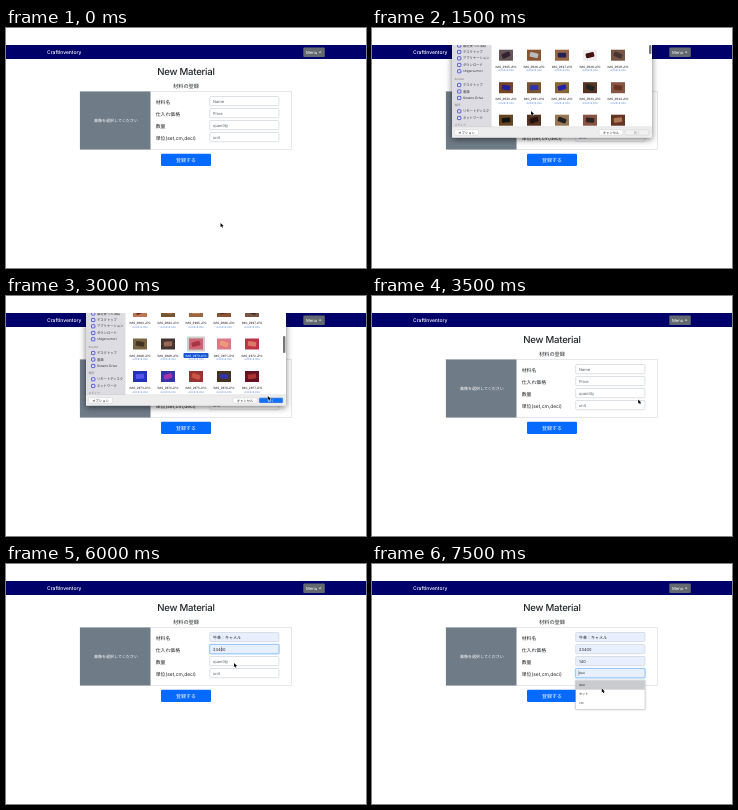
An HTML page for the animation above (8000 ms loop, 360x240 px).

```html
<!DOCTYPE html>
<html lang="ja">
<head>
<meta charset="utf-8">
<title>New Material</title>
<style>
html, body { margin: 0; width: 100%; height: 100%; overflow: hidden; background: #fff; }
svg { display: block; width: 360px; height: 240px; }
text { font-family: Inter, "Noto Sans CJK JP", "Noto Sans CJK", sans-serif; text-rendering: geometricPrecision; }
</style>
</head>
<body>
<svg id="stage" viewBox="0 0 360 240"></svg>
<script>
const STEP = 500;
const stage = document.getElementById('stage');

const rect = (x, y, w, h, fill, more = '') =>
  `<rect x="${x}" y="${y}" width="${w}" height="${h}" fill="${fill}" ${more}/>`;
// Text is centred vertically on cy.
const text = (x, cy, str, size, fill = '#212529', more = '') =>
  `<text x="${x}" y="${cy + size * .36}" font-size="${size}" fill="${fill}" ${more}>${str}</text>`;
const mid = 'text-anchor="middle"';

const fields = [
  { label: '材料名', hint: 'Name', value: '牛革：キャメル',
    options: ['牛革：ブラック', '牛革：ネイビー', '豚革：ベージュ', '牛革：ブラウン', '牛革：キャメル', '糸：ホワイト'] },
  { label: '仕入れ価格', hint: 'Price', value: '23400',
    options: ['23400', '12000', '1800', '540', '9800', '300'] },
  { label: '数量', hint: 'quantity', value: '140',
    options: ['140', '20', '136', '100', '10', '140'] },
  { label: '単位(set,cm,deci)', hint: 'unit', value: 'deci', options: ['deci', 'セット', 'cm'] }
];

// Photo lists: first file number, top of first row, scroll knob, background-foreground colours.
const views = [
  { first: 2925, top: 21.7, knob: [17, 9], tones: '655-323 853-bbb 964-225 eee-411 754-433 742-229 753-33a 863-22a 532-222 854-632 642-111 532-211 975-222 854-322 632-a75' },
  { first: 2943, top: 15, knob: [29, 14], tones: '853-532 742-26a 964-421 754-222 aaa-732 532-a64 853-229 642-a31 754-422 863-333 632-b75 742-111 853-433 964-632 533-223' },
  { first: 2963, top: 10, knob: [40, 17], tones: 'b75-633 753-a64 964-c85 853-533 754-422 764-432 433-965 c67-a34 d78-e97 b34-d76 23b-55e 33a-a3a 933-c54 432-33a 612-a33' }
];

// [cursor x, cursor y, photo view, focused field, hovered option, filled fields]
const scenes = [
  [214.5, 195], [210, 126.5], [106, 92],
  [159, 83, 0], [159, 83, 1], [190, 49, 2], [261.8, 100, 2],
  [266.2, 103.5],
  [229, 84, -1, 0, 0, 0], [227, 121.5, -1, 0, 4, 0], [227, 121.5, -1, 0, -1, 1],
  [228, 99, -1, 1, 0, 1], [228, 99, -1, 1, -1, 2],
  [230.7, 112.5, -1, 2, 0, 2], [230.7, 112.5, -1, 2, -1, 3],
  [229.8, 124.5, -1, 3, 0, 3]
];

function page() {
  return rect(0, 0, 360, 240, '#fff') + rect(0, 17, 360, 14, '#00006b') +
    text(41, 24, 'CraftInventory', 5, '#fff', 'font-weight="500"') +
    rect(297.3, 19.5, 21.5, 9.5, '#626a70', 'rx="1"') +
    text(300, 24.2, 'Menu', 4.2, '#fff') +
    '<path d="M312.8 24.6h2.6l-1.3-1.4z" fill="#fff"/>' +
    text(180, 43.5, 'New Material', 9.6, '#212529', mid + ' font-weight="500" letter-spacing="-.25"') +
    text(180, 58, '材料の登録', 5.2, '#212529', mid) +
    rect(74, 63.5, 211.5, 58, '#fff', 'stroke="#ddd" stroke-width=".7"') +
    rect(74, 63.5, 70.5, 58, '#6f7b87') +
    text(110, 92.3, '画像を選択してください', 4, '#fff', mid) +
    rect(155, 125.7, 50, 12.3, '#066aff', 'rx="1.2"') +
    text(180, 131.7, '登録する', 5, '#fff', mid);
}

function field(f, i, focus, hover, filled) {
  const y = 68.5 + 12 * i, on = i === focus, preview = on && hover >= 0;
  const done = i < filled, auto = done || preview;
  let out = text(149.7, y + 6, f.label, 4.9);
  if (on) out += rect(202.8, y - .8, 71, 10.8, '#bfdeff', 'rx="1.6"');
  out += rect(203.7, y, 69.2, 9.2, auto ? '#e8f0fe' : '#fff',
    `rx="1" stroke="${on ? '#80bdff' : '#ced4da'}" stroke-width=".7"`);
  if (preview) out += text(207, y + 4.6, f.options[hover], 3.1, '#222');
  else out += text(207, y + 4.6, done ? f.value : f.hint, 4, done ? '#222' : '#59626a');
  if (on) out += rect(done && !i ? 235.6 : done ? 215.3 : 206.7, y + 2.2, .4, 4.8, '#333');
  return out;
}

function menu(i, hover) {
  const list = fields[i].options, y = 80.2 + 12 * i, row = 9.1;
  return rect(203.8, y, 69.2, list.length * row + 1.8, '#fff',
      'stroke="#bbb" stroke-width=".5" filter="drop-shadow(0 .8px 1px #0003)"') +
    list.map((s, n) => {
      const top = y + .4 + n * row;
      return (n === hover ? rect(204, top, 68.8, row, '#c9cbce') : '') +
        text(207, top + row / 2, s, 3.1, '#222');
    }).join('');
}

function sidebar() {
  const items = [
    [17.5, '最近使った項目'], [24, 'デスクトップ'], [30.3, 'アプリケーション'], [37, 'ダウンロード'],
    [43.3, 'shigeru.mori'], [51, 'Sorano', 1], [57, 'デスクトップ'], [63.5, '書類'], [70, 'Sorano Drive'],
    [77.3, '場所', 1], [83.3, 'リモートディスク'], [90, 'ネットワーク'], [97.3, 'メディア', 1]
  ];
  return rect(80, 17, 39.5, 82, '#dcdce2') + items.map(([y, s, head]) => head
    ? text(82.5, y, s, 2.9, '#777')
    : rect(85.5, y - 1.6, 3.4, 3.2, 'none', 'rx=".6" stroke="#3c44cc" stroke-width=".8"') +
      text(91, y, s, 3.3, '#333')).join('');
}

function photos(v, chosen) {
  return v.tones.split(' ').map((pair, n) => {
    const [back, front] = pair.split('-');
    const x = 134 + 28 * (n % 5), row = Math.floor(n / 5), y = v.top + 32.5 * row;
    const picked = chosen && n === 7;
    return (picked ? rect(x - 9, y - 2, 18, 15, '#ccc', 'rx="1"') +
        rect(x - 12.5, y + 14.5, 25, 5, '#1557d6', 'rx="1"') : '') +
      rect(x - 7, y, 14, 11, '#' + back) +
      rect(x - 4.2, y + 3, 8.4, 4.8, '#' + front, `rx="1" transform="rotate(${n * 37 % 50 - 25} ${x} ${y + 5.5})"`) +
      text(x, y + 17, `IMG_${v.first + n}.JPG`, 3, picked ? '#fff' : '#222', mid) +
      text(x, y + 20.8, '4,032×3,024', 2.5, '#4a7fd6', mid);
  }).join('');
}

function button(x, label, fill, ink) {
  return rect(x, 101.8, 24, 5.3, fill, 'rx="1" stroke="#c4c4c4" stroke-width=".4"') +
    text(x + 12, 104.5, label, 3.3, ink, mid);
}

function dialog(n) {
  const v = views[n], ready = n === 2;
  return '<clipPath id="below"><path d="M0 17h360v223H0z"/></clipPath>' +
    '<clipPath id="list"><path d="M80 17h200v82H80z"/></clipPath>' +
    '<g clip-path="url(#below)">' +
    rect(80, 10, 200, 99.5, '#fff', 'rx="1" filter="drop-shadow(0 2px 3px #0008)"') +
    `<g clip-path="url(#list)">${sidebar()}${photos(v, ready)}</g>` +
    rect(277, v.knob[0], 2.4, v.knob[1], '#777', 'rx="1"') +
    rect(80, 99, 200, 10.5, '#ededed') + rect(80, 98.7, 200, .4, '#c8c8c8') +
    button(82.5, 'オプション', '#fff', '#222') +
    button(227, 'キャンセル', '#fff', '#222') +
    button(253, '開く', ready ? '#1670f5' : '#f1f1f1', ready ? '#fff' : '#aaa') + '</g>';
}

function draw([cx, cy, view = -1, focus = -1, hover = -1, filled = 0]) {
  stage.innerHTML = page() +
    fields.map((f, i) => field(f, i, focus, hover, filled)).join('') +
    (hover >= 0 ? menu(focus, hover) : '') +
    (view >= 0 ? dialog(view) : '') +
    `<path transform="translate(${cx} ${cy})" d="M0 0v4.1l1-.9.7 1.5.8-.4-.7-1.4h1.3z"
      fill="#000" stroke="#fff" stroke-width=".5" paint-order="stroke"/>`;
}

let shown = -1;
function tick() {
  const now = Math.floor(performance.now() / STEP) % scenes.length;
  if (now !== shown) draw(scenes[shown = now]);
  requestAnimationFrame(tick);
}
tick();
</script>
</body>
</html>
```
